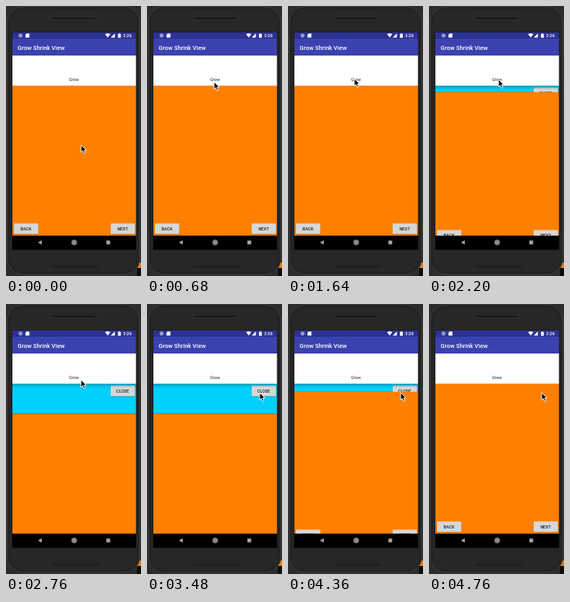
Write an HTML page that moves like this. It is 169 px wide and 338 px high and loops after 4.8 s.

```html
<!DOCTYPE html>
<html lang="en">
<head>
<meta charset="utf-8">
<title>Grow Shrink View</title>
<style>
  html, body { margin: 0; width: 100%; height: 100%; overflow: hidden; background: #222; }
  svg { display: block; }
  text { font-family: Roboto, sans-serif; }
  .label { font-size: 5.25px; font-weight: 500; text-anchor: middle; fill: #222; }
</style>
</head>
<body>
<svg width="169" height="338" viewBox="0 0 169 338">
  <defs>
    <linearGradient id="shadow" x2="0" y2="1">
      <stop offset="0" stop-opacity=".32"/>
      <stop offset=".4" stop-opacity=".12"/>
      <stop offset="1" stop-opacity="0"/>
    </linearGradient>
    <g id="button">
      <rect x="-.2" y=".6" width="31" height="13.6" rx="1" fill="#000" opacity=".22"/>
      <rect width="30.5" height="13.4" rx=".8" fill="#d6d7d7"/>
    </g>
  </defs>

  <!-- phone body -->
  <rect width="169" height="338" fill="#2b2b2b"/>
  <rect x="164" y="321" width="5" height="7" fill="#e87a0c"/>
  <rect x="164" y="328" width="5" height="10" fill="#0c0c0c"/>
  <rect x="1.5" y=".5" width="166" height="336" rx="20" fill="#262626" stroke="#3c3c3c"/>
  <rect x="4.5" y="3.5" width="160" height="330" rx="17" fill="#272727" stroke="#212121"/>
  <rect x="58" y="13.5" width="54" height="4" rx="2" fill="#1b1b1b" stroke="#343434" stroke-width=".6"/>
  <rect x="57" y="324" width="60" height="4.5" rx="2.2" fill="#202020" stroke="#2c2c2c" stroke-width=".6"/>
  <rect x="7" y="32" width="156.5" height="274" fill="#1d1d1d"/>

  <!-- status and title bars -->
  <rect x="8" y="33" width="154.7" height="9" fill="#2d3193"/>
  <rect x="8" y="41" width="154.7" height="21.5" fill="#3b42b0"/>
  <circle cx="18.2" cy="37" r="2.1" fill="#8f93c8" stroke="#b8bbdf" stroke-width=".8"/>
  <path d="M25.7 34.5h3.6v5h-4.9v-3.6z" fill="#fff"/>
  <path d="M124 35.2q3.3-2 6.6 0l-3.3 4.4z" fill="#fff"/>
  <path d="M136.3 34.3v5.2h-5.2z" fill="#fff"/>
  <path d="M140.2 35h1v-.7h1.5v.7h1v4.7h-3.5z" fill="#fff"/>
  <text x="146.6" y="39.3" font-size="5.4" font-weight="500" fill="#fff">3:26</text>
  <text x="14.6" y="54.6" font-size="7.5" font-weight="500" fill="#fff">Grow Shrink View</text>

  <!-- content -->
  <rect x="8" y="62" width="154.7" height="38" fill="#fff"/>
  <text class="label" x="85" y="94" style="font-weight:400">Grow</text>
  <svg x="8" y="99.6" width="154.7" height="188.4">
    <rect id="panel" width="155" height="0" fill="#00d0fc"/>
    <use href="#button" x="123" y="2.6"/>
    <text class="label" x="138" y="11">CLOSE</text>
    <rect width="155" height="6" fill="url(#shadow)"/>
    <g id="page">
      <rect width="155" height="189" fill="#ff8000"/>
      <use href="#button" x="2" y="172.6"/>
      <text class="label" x="17" y="181">BACK</text>
      <use href="#button" x="123" y="172.6"/>
      <text class="label" x="138" y="181">NEXT</text>
    </g>
  </svg>

  <!-- navigation bar -->
  <rect x="8" y="287.5" width="154.7" height="17.5" fill="#000"/>
  <path d="M40 296l4.8-2.8v5.6z" fill="#a5a5a5"/>
  <circle cx="85.3" cy="296" r="3.3" fill="#8c8c8c" stroke="#6a6a6a" stroke-width=".8"/>
  <rect x="125.6" y="293.6" width="4.8" height="4.8" fill="#a5a5a5"/>

  <path id="cursor" d="M0 0v9.2l2.1-1.9 1.5 3.5 1.7-.7-1.5-3.4h2.9z" fill="#000" stroke="#fff" stroke-width=".9"/>
</svg>
<script>
const LOOP = 4800, PANEL_HEIGHT = 38;
const [panel, page, cursor] = ['panel', 'page', 'cursor'].map(id => document.getElementById(id));

// time, x, y of the pointer tip
const pointerPath = [
  [0, 94, 174], [120, 94, 174], [660, 84, 95], [1100, 84, 94], [1500, 83, 91],
  [1900, 83, 91], [2200, 87, 92], [2600, 88, 93], [3350, 141, 111], [LOOP, 141, 111]
];

const ease = p => (1 - Math.cos(Math.PI * Math.min(1, Math.max(0, p)))) / 2;
const ramp = (t, start, end) => ease((t - start) / (end - start));

function pointerAt(t) {
  const i = pointerPath.findIndex(point => point[0] > t);
  const [t0, x0, y0] = pointerPath[i - 1], [t1, x1, y1] = pointerPath[i];
  const p = ramp(t, t0, t1);
  return [x0 + (x1 - x0) * p, y0 + (y1 - y0) * p];
}

function draw(now) {
  const t = now % LOOP;
  const open = PANEL_HEIGHT * (ramp(t, 1985, 2685) - ramp(t, 3905, 4605));
  panel.setAttribute('height', open);
  page.setAttribute('transform', `translate(0 ${open})`);
  cursor.setAttribute('transform', `translate(${pointerAt(t)})`);
  requestAnimationFrame(() => draw(performance.now()));
}
draw(performance.now());
</script>
</body>
</html>
```
